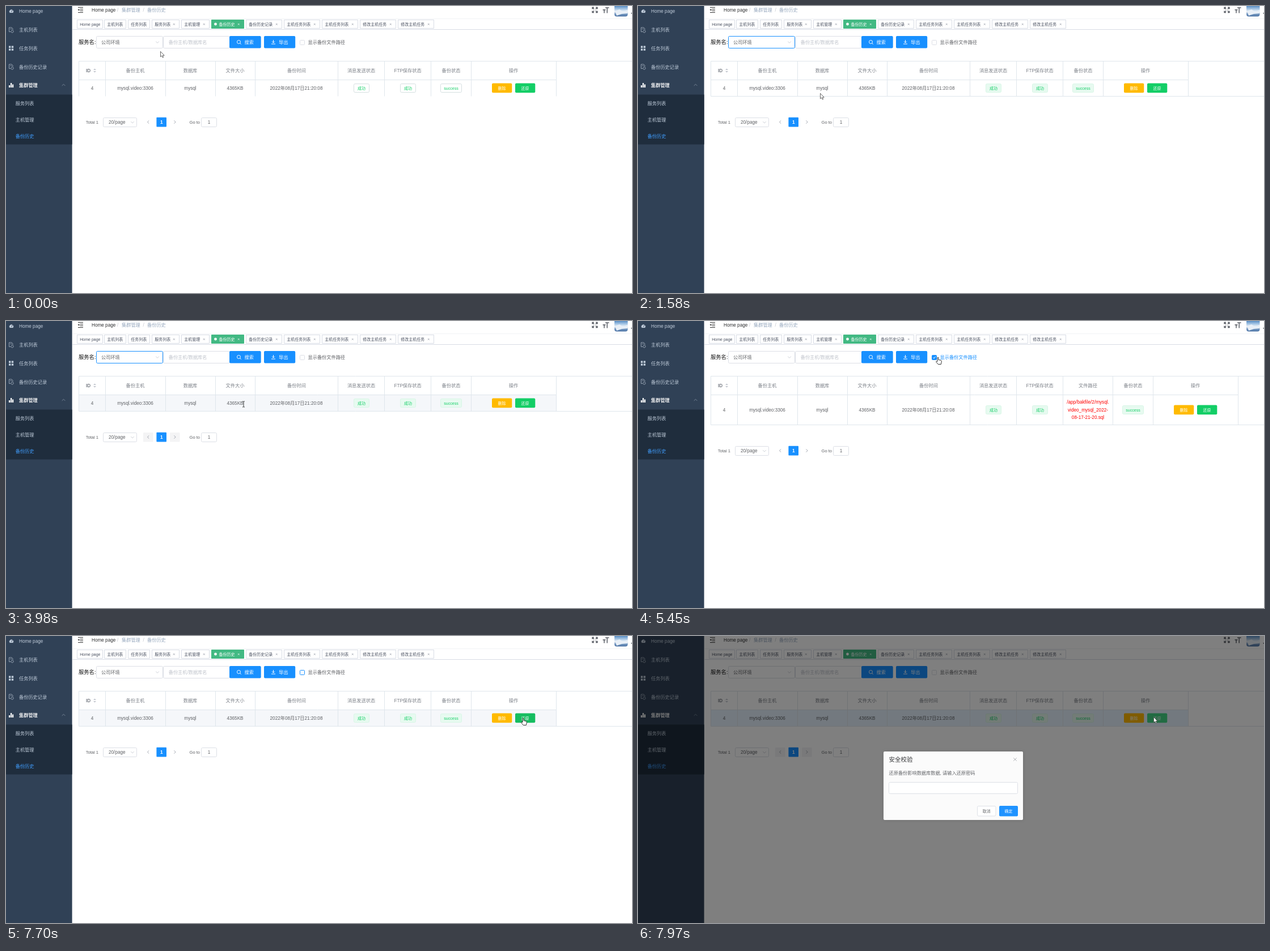
These frames come from a looping animation (1104x507 px, 8 s). An HTML page with a canvas:

```html
<!DOCTYPE html>
<html lang="zh">
<head>
<meta charset="utf-8">
<style>
  html, body { margin: 0; width: 100%; height: 100%; overflow: hidden; background: #fff; }
  canvas { display: block; }
</style>
</head>
<body>
<canvas id="stage" width="1104" height="507"></canvas>
<script>
const ctx = document.getElementById('stage').getContext('2d');
const LOOP = 8000;
const FONT = '"Liberation Sans", "Noto Sans CJK SC", "Noto Sans CJK", sans-serif';
const BLUE = '#1890ff', GREEN = '#13ce66', GRAY = '#606266', PALE = '#c0c4cc', LINE = '#dfe6ec', EDGE = '#dcdfe6';

function text(str, x, y, color = GRAY, size = 8.2, align = 'left', weight = 400) {
  ctx.font = `${weight} ${size}px ${FONT}`;
  ctx.textAlign = align;
  ctx.fillStyle = color;
  ctx.fillText(str, x, y + size * .37);
}

function box(x, y, w, h, fill, stroke, radius = 2) {
  ctx.beginPath();
  const inset = stroke ? .5 : 0;
  ctx.roundRect(x + inset, y + inset, w - 2 * inset, h - 2 * inset, radius);
  if (fill) { ctx.fillStyle = fill; ctx.fill(); }
  if (stroke) { ctx.strokeStyle = stroke; ctx.lineWidth = 1; ctx.stroke(); }
}

// Strokes (or fills) an SVG path placed at x, y.
function icon(d, x, y, color, width = 1, fill) {
  ctx.save();
  ctx.translate(x, y);
  const path = new Path2D(d);
  if (fill) { ctx.fillStyle = fill; ctx.fill(path); }
  if (width) { ctx.strokeStyle = color; ctx.lineWidth = width; ctx.stroke(path); }
  ctx.restore();
}

const rule = (x1, y1, x2, y2, color = LINE) => icon(`M${x1} ${y1}L${x2} ${y2}`, .5, .5, color);
const cross = (x, y, r, color) => icon(`M${-r} ${-r}L${r} ${r}M${r} ${-r}L${-r} ${r}`, x, y, color, .7);
const caret = (x, y, color, up = 1) => icon(`M-2.8 ${-1.4 * up}L0 ${1.4 * up}L2.8 ${-1.4 * up}`, x, y, color, .8);

function sidebar() {
  const tint = '#bfcbd9';
  box(0, 0, 116.6, 507, '#304156', null, 0);
  box(0, 156.5, 116.6, 88, '#1f2d3d', null, 0);
  ['Home page', '主机列表', '任务列表', '备份历史记录', '集群管理'].forEach((label, i) =>
    text(label, 23, 9.3 + i * 32.75, i == 4 ? '#f4f4f5' : tint, 8.2, 'left', i == 4 ? 700 : 400));
  ['服务列表', '主机管理', '备份历史'].forEach((label, i) =>
    text(label, 16.7, 171.5 + i * 29.3, i == 2 ? '#409eff' : tint));
  caret(101.5, 139.5, '#8794a5', -1);
  icon('M-3 3A4 4 0 1 1 3 3ZM0 1L1.5 -2', 9.5, 9.5, '#304156', .9, tint);
  for (const y of [42, 107])
    icon('M-3.5 -1V-4H1L3 -2V0M-3.5 -1V3.5H-1M-1.5 -1.5H1M0 3.8A2 2 0 1 0 4 2A2 2 0 1 0 0 3.8', 9, y, '#9fabb9', .9);
  icon('M-4 -4H-.6V-.6H-4ZM.8 -4H4.2V-.6H.8ZM-4 .8H-.6V4.2H-4ZM.8 .8H4.2V4.2H.8Z', 9, 74.5, tint, 0, tint);
  icon('M-4 0H-1.8V4H-4ZM-1 -4H1.2V4H-1ZM2 -1.5H4.2V4H2Z', 9, 140, '#fff', 0, '#fff');
}

function topBar() {
  icon('M0 0H9M3.5 3H9M3.5 6H9M0 9H9', 127, 2.5, '#333', 1.2);
  icon('M2.8 2.8L0 4.5L2.8 6.2Z', 126.5, 2.2, '', 0, '#333');
  text('Home page', 151, 7, '#303133');
  text('/', 196, 7, PALE);
  text('集群管理', 204, 7, '#97a8be');
  text('/', 241.5, 7, PALE);
  text('备份历史', 249, 7, '#97a8be');
  icon('M-4.5 -1.5V-4.5H-1.5M1.5 -4.5H4.5V-1.5M4.5 1.5V4.5H1.5M-1.5 4.5H-4.5V1.5M-4 -4L-1.3 -1.3M4 -4L1.3 -1.3M4 4L1.3 1.3M-4 4L-1.3 1.3', 1038.5, 7, '#5a5e66', 1.3);
  icon('M-1 -4H5.5M2.2 -4V5.5M-5.5 -.2H-.5M-3 -.2V5.5', 1058, 7, '#5a5e66', 1.5);
  const sky = ctx.createLinearGradient(0, 0, 0, 18);
  [[0, '#5a8fc6'], [.3, '#a9c8e6'], [.55, '#eef4fa'], [.75, '#7d9fc6'], [1, '#4d74a6']].forEach(s => sky.addColorStop(...s));
  box(1073, -4, 23.5, 22.5, sky, null, 4);
  icon('M0 8L8 5L14 9L22 6V12L12 13L3 16Z', 1074, 1, '', 0, '#e8eff7');
  icon('M-1 -1H2L.5 1Z', 1103, 13, '', 0, '#5a5e66');
  rule(117, 22, 1104, 22, '#f2f4f6');
  rule(117, 41, 1104, 41, '#d8dce5');

  const tags = [[125, 46, 'Home page'], [173, 39, '主机列表'], [215, 39, '任务列表'], [257, 49, '服务列表'],
    [309, 50, '主机管理'], [362, 58, '备份历史'], [423, 64, '备份历史记录'], [490, 64, '主机任务列表'],
    [557, 64, '主机任务列表'], [624, 64, '修改主机任务'], [691, 64, '修改主机任务']];
  tags.forEach(([x, w, label], i) => {
    const active = i == 5;
    box(x, 24, w, 16, active ? '#42b983' : '#fff', active ? '#42b983' : '#d8dce5', 0);
    text(label, x + (active ? 13.5 : 5.3), 32, active ? '#fff' : '#495060', 7);
    if (active) icon('M-2.4 0A2.4 2.4 0 1 1 2.4 0A2.4 2.4 0 1 1 -2.4 0', 369.5, 32, '', 0, '#fff');
    if (i > 2) cross(x + w - 9.7, 32.3, 1.4, active ? '#fff' : '#8a909c');
  });
}

function filters(s) {
  text('服务名:', 128, 64, '#111', 9.3);
  box(159, 53, 118, 22, '#fff', s.focused ? BLUE : EDGE);
  text('公司环境', 168, 64);
  caret(267, 64, PALE);
  box(277, 53, 118, 22, '#fff', EDGE);
  text('备份主机/数据库名', 286.7, 64, PALE);
  box(394, 53, 55.7, 21.6, BLUE);
  icon('M-3.5 -.5A3 3 0 1 1 2.5 -.5A3 3 0 1 1 -3.5 -.5M1.7 1.7L3.7 3.7', 411, 64, '#fff');
  text('搜索', 420.5, 64, '#fff', 8.2, 'left', 500);
  box(455, 53, 55.2, 21.6, BLUE);
  icon('M0 -3.5V1.5M-2.3 -.8L0 1.5L2.3 -.8M-3.5 3.5H3.5', 471.5, 63.5, '#fff');
  text('导出', 481, 64, '#fff', 8.2, 'left', 500);
  box(518, 60, 9, 9, s.checked ? BLUE : '#fff', s.checked || s.boxFocused ? BLUE : EDGE, 1);
  if (s.checked) icon('M-2 0L-.5 1.6L2.2 -1.8', 522.5, 64.5, '#fff');
  text('显示备份文件路径', 532.5, 64, s.checked ? BLUE : GRAY);
}

function badge(label, center, y, w, tinted) {
  box(center - w / 2, y - 8, w, 16, tinted ? '#e7faf0' : '#fff', tinted ? '#d8f6e6' : '#d5dfe0');
  text(label, center, y, GREEN, 7, 'center');
}

function button(label, x, y, fill) {
  box(x, y - 8.4, 35.3, 16.7, fill);
  text(label, x + 17.5, y, '#fff', 7, 'center', 500);
}

function table(s) {
  const shift = s.checked ? 88 : 0, bottom = s.checked ? 183 : 159, y = s.checked ? 157 : 145;
  const right = 970 + shift;
  if (s.rowFill) box(129, 131, right - 129, bottom - 131, s.rowFill, null, 0);
  const edges = [128, 175, 281, 369, 439, 585, 667, 749, 820 + shift, right];
  if (s.checked) edges.push(837);
  edges.forEach(x => rule(x, 97, x, bottom));
  rule(128, 97, 1104, 97);
  rule(128, 130, right, 130);
  if (s.settled) rule(128, bottom, 1104, bottom);

  const heads = [['备份主机', 228], ['数据库', 325], ['文件大小', 404], ['备份时间', 512.5], ['消息发送状态', 626.5],
    ['FTP保存状态', 708.5], ['备份状态', 785 + shift], ['操作', 895 + shift]];
  if (s.checked) heads.push(['文件路径', 793.5]);
  text('ID', 141, 114, '#7c8088', 8.2, 'left', 700);
  icon('M-2.5 -1L0 -3.6L2.5 -1ZM-2.5 1L0 3.6L2.5 1Z', 156.5, 114, '', 0, PALE);
  heads.forEach(([label, x]) => text(label, x, 114, '#7c8088', 8.2, 'center', 500));

  [['4', 152], ['mysql.video:3306', 228], ['mysql', 325], ['4365KB', 404], ['2022年08月17日21:20:08', 512]]
    .forEach(([label, x]) => text(label, x, y, GRAY, 8.2, 'center'));
  badge('成功', 627, y, 28, s.settled);
  badge('成功', 709, y, 28, s.settled);
  badge('success', 785 + shift, y, 38, s.settled);
  if (s.checked)
    ['/app/bakfile/2/mysql.', 'video_mysql_2022-', '08-17-21-20.sql'].forEach((line, i) =>
      text(line, 793.5, 143.3 + i * 13.4, '#f00', 8.2, 'center'));
  button('删除', 857 + shift, y, '#ffba00');
  button('还原', 898 + shift, y, s.restoreFill);
}

function pagination(s) {
  const y = s.checked ? 229 : 205;
  text('Total 1', 140.7, y, GRAY, 7.6);
  box(171, y - 8, 60, 17, '#fff', EDGE);
  text('20/page', 181, y);
  caret(223, y + .5, PALE);
  for (const [x, dir] of [[242, 1], [289, -1]]) {
    if (s.pagerFill) box(x, y - 8, 17.5, 16.5, '#f4f4f5', null, 1);
    icon(`M${1.4 * dir} -2.6L${-1.4 * dir} 0L${1.4 * dir} 2.6`, x + 8.8, y, '#a5aab3', 1);
  }
  box(265.4, y - 8.2, 17.6, 16.6, BLUE, null, 1);
  text('1', 274.3, y, '#fff', 8.2, 'center', 700);
  text('Go to', 323.5, y, GRAY, 7.6);
  box(344, y - 8, 28, 17, '#fff', EDGE);
  text('1', 358, y, GRAY, 8.2, 'center');
}

function dialog(open) {
  box(0, 0, 1104, 507, `rgba(0,0,0,${open ? .5 : .29})`, null, 0);
  ctx.save();
  ctx.globalAlpha = open ? .97 : .33;
  ctx.translate(0, open ? 0 : -7);
  ctx.shadowColor = 'rgba(0,0,0,.12)';
  ctx.shadowBlur = 7;
  box(433, 204, 246, 121, '#fff');
  ctx.shadowBlur = 0;
  text('安全校验', 442.5, 218, '#303133', 10.5);
  cross(665, 218, 2.8, '#909399');
  text('还原备份影响数据库数据, 请输入还原密码', 442.5, 242.3);
  if (open) {
    box(442, 258, 228, 21, '#fff', EDGE);
    box(598, 300, 33.5, 18.5, '#fff', EDGE);
  }
  text('取消', 614.7, 309.3, GRAY, 7, 'center');
  box(637, 300, 33, 18.5, BLUE);
  text('确定', 653.5, 309.3, '#fff', 7, 'center', 500);
  ctx.restore();
}

const POINTERS = {
  arrow: ['M.5 .3V9.8L2.7 7.8L4.2 11.2L5.7 10.5L4.3 7.3H7.2Z', '#444', .8, '#fff'],
  hand: ['M-.9 7.5V.7Q0 -.6 1 .7V4.5L5.3 5.5Q6.6 6 6.3 8L5.3 12.5H.3L-3.2 8.3Q-3.2 6.6 -1.8 7Z', '#222', .9, '#fff'],
  beam: ['M-2 -5H-.5L0 -4.5L.5 -5H2M0 -4.5V4.5M-2 5H-.5L0 4.5L.5 5H2', '#222', .9, null]
};

// time, x, y, pointer shape from that time on
const MOVES = [
  [0, 272, 80, 'arrow'], [120, 272, 80, 'arrow'], [450, 255, 66, 'hand'], [950, 225, 62, 'hand'],
  [1250, 225, 62, 'arrow'], [1580, 321, 154, 'arrow'], [1900, 290, 205, 'arrow'], [2250, 190, 245, 'arrow'],
  [2830, 132, 151, 'arrow'], [3330, 391, 152, 'beam'], [3900, 391, 152, 'beam'], [3955, 419, 147, 'beam'],
  [4400, 545, 148, 'arrow'], [4955, 529, 64, 'hand'], [6000, 529, 64, 'arrow'], [6950, 912, 145, 'hand'],
  [7819, 912, 145, 'hand'], [7820, 912, 143, 'arrow'], [7969, 912, 143, 'arrow'],
  [7970, 909, 143, 'arrow'], [LOOP, 909, 143, 'arrow']];

// The pointer is refreshed eight times a second, until the final click.
function pointerAt(t) {
  const time = t < 7690 ? Math.max(0, Math.floor((t - 80) / 125) * 125 + 80) : t;
  const next = MOVES.findIndex(m => m[0] > time);
  const [t0, x0, y0, shape] = MOVES[next - 1], [t1, x1, y1] = MOVES[next];
  const k = (time - t0) / (t1 - t0);
  return { x: x0 + (x1 - x0) * k, y: y0 + (y1 - y0) * k, shape };
}

function draw(t) {
  const pointer = pointerAt(t);
  const hovered = pointer.y > 131 && pointer.y < 153;
  const clicked = t >= 7820;
  const state = {
    focused: t >= 700 && t < 5200,
    checked: t >= 5200 && t < 6040,
    boxFocused: t >= 6040 && !clicked,
    settled: t >= 700,
    rowFill: clicked ? '#e8f4ff' : hovered && '#f5f7fa',
    restoreFill: clicked ? '#42d885' : t >= 7700 ? '#16bd60' : t >= 7150 ? '#42d885' : GREEN,
    pagerFill: t >= 2360 && t < 5200 || clicked
  };
  box(0, 0, 1104, 507, '#fff', null, 0);
  sidebar();
  topBar();
  filters(state);
  table(state);
  pagination(state);
  if (clicked) dialog(t >= 7970);
  const [path, ...style] = POINTERS[pointer.shape];
  icon(path, pointer.x, pointer.y, ...style);
}

const start = performance.now();
function frame() {
  draw((performance.now() - start) % LOOP);
  requestAnimationFrame(frame);
}
frame();
</script>
</body>
</html>
```
